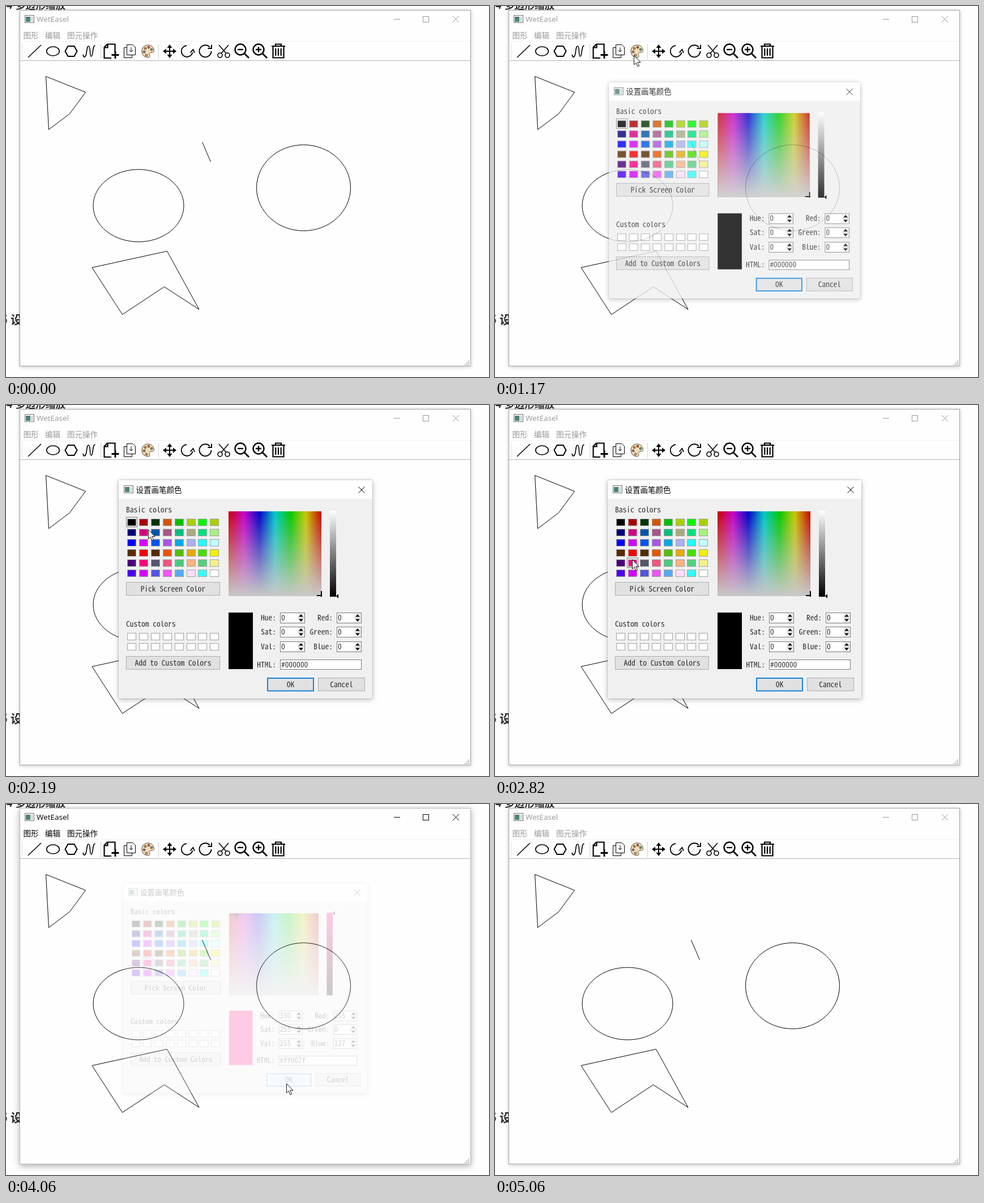
Animation, 853 px wide and 656 px high, one loop 5.24 s. Source, as an HTML page:

```html
<!DOCTYPE html>
<html lang="zh">
<head>
<meta charset="utf-8">
<title>WetEasel</title>
<style>
html, body { margin: 0; width: 100%; height: 100%; overflow: hidden; background: #fefefe; }
svg { display: block; }
text { fill: currentColor; white-space: pre; }
.ui { font: 13.5px "Noto Sans CJK SC", "Noto Sans CJK", sans-serif; }
.name { font: 13.5px "Open Sans", sans-serif; }
.page { font-weight: bold; font-family: "Noto Sans CJK SC", "Noto Sans CJK", sans-serif; color: #2c2c2c; }
.mono { font-family: "Noto Sans Mono CJK SC", "Liberation Mono", monospace; font-weight: 300; color: #2e2e2e; }
.ink { fill: none; stroke: #000; }
.sharp { shape-rendering: crispEdges; }
#dialog { transform-origin: 423px 326px; }
</style>
</head>
<body>
<svg id="stage" width="853" height="656" viewBox="0 0 853 656"></svg>
<script>
const LOOP = 5240;
const stage = document.getElementById('stage');
const $ = id => document.getElementById(id);

const rect = (x, y, w, h, fill, stroke = 'none', more = '') =>
  `<rect x="${x}" y="${y}" width="${w}" height="${h}" fill="${fill}" stroke="${stroke}" ${more}/>`;
const path = (d, width = 1, more = '') =>
  `<path class="ink" d="${d}" stroke-width="${width}" ${more}/>`;
const solid = (d, more = '') => `<path d="${d}" ${more}/>`;
const text = (x, y, s, cls, more = '') => `<text x="${x}" y="${y}" class="${cls}" ${more}>${s}</text>`;
const ring = (x, y, rx, ry, width) =>
  `<ellipse class="ink" cx="${x}" cy="${y}" rx="${rx}" ry="${ry}" stroke-width="${width}"/>`;
const end = 'text-anchor="end"', middle = 'text-anchor="middle"';

// Monospaced text with a fixed advance of 6.75 px, whichever font is present
const pen = document.createElement('canvas').getContext('2d');
pen.font = '100px "Noto Sans Mono CJK SC", "Liberation Mono", monospace';
const monoSize = 675 / pen.measureText('0').width;

const appIcon = (x, y) => rect(x + .5, y + .5, 16, 13, '#f4f4f4', '#777') +
  rect(x + 2, y + 3, 8, 9, 'url(#teal)') + rect(x + 11, y + 3, 4, 9, '#d4d8da');

const lens = (x, sign) => ring(x, 77, 9.5, 9.5, 2.4) + path(`M${x + 7} 84l8 8`, 2.8) + path(sign, 2.3);

function toolbar() {
  const spots = [[246, 75, '#c98238'], [252, 73, '#c4503c'], [257, 77, '#629a80'], [244, 81, '#76709a'], [248, 87, '#d59a68']];
  return path('M39 91L62 69', 1.5) +
    ring(83, 80, 11.3, 8, 1.6) +
    path('M104.5 80L109.5 71H120.5L125.5 80L120.5 89H109.5Z', 2) +
    path('M136 86C137 92 140 91 141.5 86C143 80 142.5 71 146 71C150 71 147 89 150.5 89C154.5 89 152 70 157.5 70', 1.6) +
    path('M186 92H173.5V73L179 67.5H192.5V81M179.5 68V73.5H174', 2.2) +
    path('M193 80V93M186.5 86.5H199.5', 2.8) +
    path('M213.5 68.5H224L228.5 73V86.5H213.5ZM213.5 73.5H208.5V91.5H222.5V86.5M221 73V81M218 78L221 81L224 78', 1) +
    '<path d="M251 69c-7 0-11 5-11 11s4 11 11 11c4 0 3-3 2-5s1-4 4-4c4 0 5-1 4-5c-1-5-5-8-10-8z" fill="#f5ddb6" stroke="#51463a"/>' +
    spots.map(([x, y, c]) => `<circle cx="${x}" cy="${y}" r="2" fill="${c}" stroke="#51463a" stroke-width=".8"/>`).join('') +
    path('M281 80H297M289 72V88', 2) +
    solid('M289 68l4.5 6h-9zM289 92l4.5-6h-9zM277 80l6-4.5v9zM301 80l-6-4.5v9z') +
    path('M319 70a10 10 0 1 0 10.5 12M325.5 82.5L330.5 77L333 83', 1.8) +
    path('M360 73a10.5 10.5 0 1 0 2.5 7M363 68.5V75H356.5', 1.9) +
    ring(378, 87, 4, 4, 1.6) + ring(391, 87, 4, 4, 1.6) +
    path('M376 69L389 84M393 69L380 84', 1.6) +
    lens(414, 'M409 77H419') + lens(446, 'M441 77H451M446 72V82') +
    path('M469 71H493M476 71V67.5H486V71M471.5 71V91.5H490.5V71M476.3 75V88M481 75V88M485.7 75V88', 2.2);
}

function mainWindow() {
  let grip = '', handle = '';
  for (let r = 0; r < 3; r++)
    for (let c = 0; c <= r; c++) grip += rect(816 - 3 * c, 627 + 3 * r, 2, 2, '#b4b4b4');
  for (let y = 67; y < 94; y += 3) handle += rect(28, y, 1, 1, '#a8a8a8');
  return rect(24.5, 7.5, 796, 629, '#fefefe', '#a6a6a6', 'id="frame"') +
    appIcon(33, 16) +
    `<g id="caption">${text(54, 28, 'WetEasel', 'name')}
      <path class="sharp" d="M685 23.5H696M736.5 18.5H746.5V28.5H736.5Z" fill="none" stroke="currentColor"/>
      <path d="M789 18L800 29M800 18L789 29" fill="none" stroke="currentColor"/></g>` +
    `<g id="menu">${text(30.5, 57, '图形', 'ui')}${text(69, 57, '编辑', 'ui')}${text(108, 57, '图元操作', 'ui')}</g>` +
    rect(25, 62, 795, 1, '#f2f2f2') + rect(25, 96, 795, 1, '#b4b4b4') +
    rect(167, 67, 1, 27, '#d2d2d2') + rect(269, 67, 1, 27, '#d2d2d2') +
    handle + toolbar() + grip +
    path('M70.5 124.5L140.5 152.5L112.5 190.5L75.5 218.5ZM346.5 240.5L361.5 275.5') +
    path('M152 462.5L284.5 433.5L341 536.5L279.5 496.5L205.5 545.5Z') +
    ring(234, 353, 80, 64, 1) + ring(525.5, 321.5, 83, 76, 1);
}

const SWATCHES = [
  '000000 a80000 003400 d45500 00bf00 a9d000 00f400 a9d000',
  '000078 d4007f 0055a9 a9558a 00bf7f aaaa80 00e07f a9f07f',
  '0000ff d400ff 0055f0 a955e6 00aae8 aab0f0 1fffff bfffff',
  '552b00 f40000 552b00 e85500 55bf00 e8aa00 45e000 f0f000',
  '4a0078 ff007f 55556f f0557f 4acb7f ffb27f 55d07f f5f08a',
  '4a00ee d400ff 5555e0 ee55f4 55aaf4 ffddff 33ffff ffffff'
].map(row => row.split(' '));

const swatch = (col, y, fill) => rect(214.5 + Math.round(20.9 * col), y + .5, 15, 12, fill, '#a4a4a4');

const button = (x, y, w, label) => rect(x + .5, y + .5, w, 23, '#e1e1e1', '#adadad') +
  text(x + w / 2 + .5, y + 17, label, 'mono', middle);

const spin = (x, y, label, id) => text(x - 7, y + 14, label + ':', 'mono', end) +
  rect(x + .5, y + .5, 43, 18, '#fff', '#7a7a7a') +
  rect(x + 31, y + 1, 12, 17, '#f0f0f0') + rect(x + 31, y + 9, 12, 1, '#d0d0d0') +
  solid(`M${x + 37} ${y + 3}l4 4.5h-8zM${x + 37} ${y + 16}l4-4.5h-8z`) +
  text(x + 2, y + 14, '0', 'mono', `id="${id}"`);

function dialog() {
  let out = rect(199, 133, 448, 386, '#f0f0f0', 'none',
      'style="filter:drop-shadow(0 0 1px rgba(0,0,0,.28)) drop-shadow(0 2px 5px rgba(0,0,0,.26))"') +
    rect(199, 133, 448, 33, '#fff') + appIcon(208, 142) +
    text(229.5, 154.5, '设置画笔颜色', 'ui') +
    path('M622.5 144.5L633.5 155.5M633.5 144.5L622.5 155.5') +
    text(212, 189.5, 'Basic colors', 'mono') + text(212, 391.5, 'Custom colors', 'mono');
  SWATCHES.forEach((row, r) => row.forEach((c, i) => out += swatch(i, 201 + Math.round(17.9 * r), '#' + c)));
  for (const y of [403, 421]) for (let i = 0; i < 8; i++) out += swatch(i, y, '#fff');
  out += `<g id="pick">${rect(212.5, 198.5, 19, 17, 'none', '#777')}${rect(213.5, 199.5, 17, 15, 'none', '#fff')}</g>`;
  out += button(212, 313, 165, 'Pick Screen Color') + button(212, 444, 165, 'Add to Custom Colors') +
    rect(393, 188, 164, 150, 'url(#hues)') + rect(393, 188, 164, 150, 'url(#pale)') +
    `<g clip-path="url(#field)">${path('M-8 0H8M0 -8V8', 2, 'id="cross"')}</g>` +
    rect(572, 187, 11, 152, 'url(#value)') +
    solid('M583 0l4-4v8z', 'id="knob"') +
    rect(393, 367, 43, 100, '#000', 'none', 'id="sample"');
  [['Hue', 'Red'], ['Sat', 'Green'], ['Val', 'Blue']].forEach(([a, b], i) => {
    const y = 367 + Math.round(25.3 * i);
    out += spin(484, y, a, a) + spin(584, y, b, b);
  });
  return out + text(477, 463.5, 'HTML:', 'mono', end) +
    rect(484.5, 450.5, 143, 17, '#fff', '#7a7a7a') + text(486, 463.5, '', 'mono', 'id="html"') +
    rect(462, 483, 81, 22.5, '#e1e1e1', '#0078d7', 'id="ok"') +
    text(502.5, 499, 'OK', 'mono', middle) + button(551, 482, 82, 'Cancel');
}

const hueStops = ['c80000', 'c800c8', '0000c8', '00c8c8', '00c800', 'c8c800', 'c80000']
  .map((c, i) => `<stop offset="${i / 6}" stop-color="#${c}"/>`).join('');

stage.innerHTML = `<defs>
  <linearGradient id="hues">${hueStops}</linearGradient>
  <linearGradient id="pale" x2="0" y2="1"><stop stop-color="#c8c8c8" stop-opacity="0"/><stop offset="1" stop-color="#c8c8c8"/></linearGradient>
  <linearGradient id="value" x2="0" y2="1"><stop id="top"/><stop offset="1" stop-color="#000"/></linearGradient>
  <linearGradient id="teal" x2="1" y2="1"><stop stop-color="#56708a"/><stop offset="1" stop-color="#3f9468"/></linearGradient>
  <clipPath id="field"><rect x="393" y="188" width="165" height="151"/></clipPath></defs>` +
  text(11.5, 5, '2.4', 'page', end + ' font-size="17.6"') + text(17, 5, '多边形缩放', 'page', 'font-size="17.6"') +
  text(3, 562, '2.5', 'page', end + ' font-size="21"') + text(8, 562, '设置', 'page', 'font-size="21"') +
  mainWindow() + `<g id="dialog">${dialog()}</g>` +
  '<path id="cursor" d="M.5 .5V17L4 13.5L7 20L9.6 18.9L6.7 12.5H12Z" fill="#fff" stroke="#000" stroke-width=".9"/>';
for (const el of stage.querySelectorAll('.mono')) el.style.fontSize = monoSize + 'px';

// Screen updates: first time, last time, number of steps
const RUNS = [[0, 0, 1], [70, 530, 7], [620, 850, 4], [1000, 1500, 7], [1560, 2030, 7], [2120, 2580, 7],
  [2660, 2820, 3], [2980, 2980, 1], [3130, 3590, 7], [3670, 4140, 7], [4440, 4600, 3], [5060, 5060, 1]];
const TICKS = RUNS.flatMap(([a, b, n]) =>
  Array.from({ length: n }, (_, i) => Math.floor((a + (b - a) * i / Math.max(1, n - 1)) / 10) * 10));

// Pointer path: time, x, y
const ROUTE = [[70, 676, 599], [300, 440, 310], [530, 271, 103], [620, 255, 90], [770, 239, 78], [1080, 239, 78],
  [1330, 258, 106], [1500, 290, 200], [1790, 282, 231], [2030, 262, 243], [2190, 251, 220],
  [2580, 242, 267], [2820, 242, 273], [2980, 242, 273], [3130, 255, 290], [3360, 375, 412],
  [3510, 472, 491], [3590, 490, 492], [3670, 495, 494], [4360, 495, 494], [4440, 560, 537], [4520, 710, 633]];

const clamp = v => Math.max(0, Math.min(1, v));

function along(t) {
  const i = ROUTE.findIndex(p => p[0] >= t);
  if (i < 1) return ROUTE[i < 0 ? ROUTE.length - 1 : 0].slice(1);
  const [a, b] = [ROUTE[i - 1], ROUTE[i]];
  const k = (t - a[0]) / (b[0] - a[0]);
  return [a[1] + (b[1] - a[1]) * k, a[2] + (b[2] - a[2]) * k];
}

function draw(t) {
  const within = (a, b) => t >= a && t < b;
  const [x, y] = along(t);
  $('cursor').setAttribute('transform', `translate(${Math.round(x)} ${Math.round(y)})`);
  $('cursor').style.display = within(70, 4600) ? '' : 'none';

  const back = within(3980, 5060);
  const active = within(770, 1000) || back;
  $('caption').style.color = active ? '#000' : '#999';
  $('menu').style.color = within(770, 1080) || back ? '#000' : '#999';
  $('frame').setAttribute('stroke', active ? '#b8b8b8' : '#a6a6a6');
  $('frame').style.filter = active
    ? 'drop-shadow(0 3px 6px rgba(0,0,0,.32))' : 'drop-shadow(0 1px 3px rgba(0,0,0,.24))';

  const show = t < 3900 ? clamp((t - 1000) / 200) : clamp(1 - (t - 3900) / 200);
  const box = $('dialog').style;
  box.display = show ? '' : 'none';
  box.opacity = show;
  box.transform = `scale(${.9525 + .0475 * show})`;

  $('pick').setAttribute('transform', t >= 2740 ? 'translate(21 72)' : '');
  const pink = t >= 2980;
  const color = pink ? '#ff007f' : '#000000';
  $('sample').setAttribute('fill', color);
  $('html').textContent = color;
  $('top').setAttribute('stop-color', pink ? color : '#fff');
  $('knob').setAttribute('transform', `translate(0 ${pink ? 188 : 338})`);
  $('cross').setAttribute('transform', pink ? 'translate(407 190)' : 'translate(557 337)');
  const values = { Hue: 330, Sat: 255, Val: 255, Red: 255, Green: 0, Blue: 127 };
  for (const id in values) $(id).textContent = pink ? values[id] : 0;
  const hover = t >= 3510;
  $('ok').setAttribute('fill', hover ? '#e5f1fb' : '#e1e1e1');
  $('ok').setAttribute('stroke-width', hover ? 1.1 : 1.8);
}

const start = performance.now();
let last = -1;
function frame() {
  const t = (performance.now() - start) % LOOP;
  const tick = TICKS.findLast(v => v <= t);
  if (tick !== last) draw(last = tick);
  requestAnimationFrame(frame);
}
frame();
</script>
</body>
</html>
```
